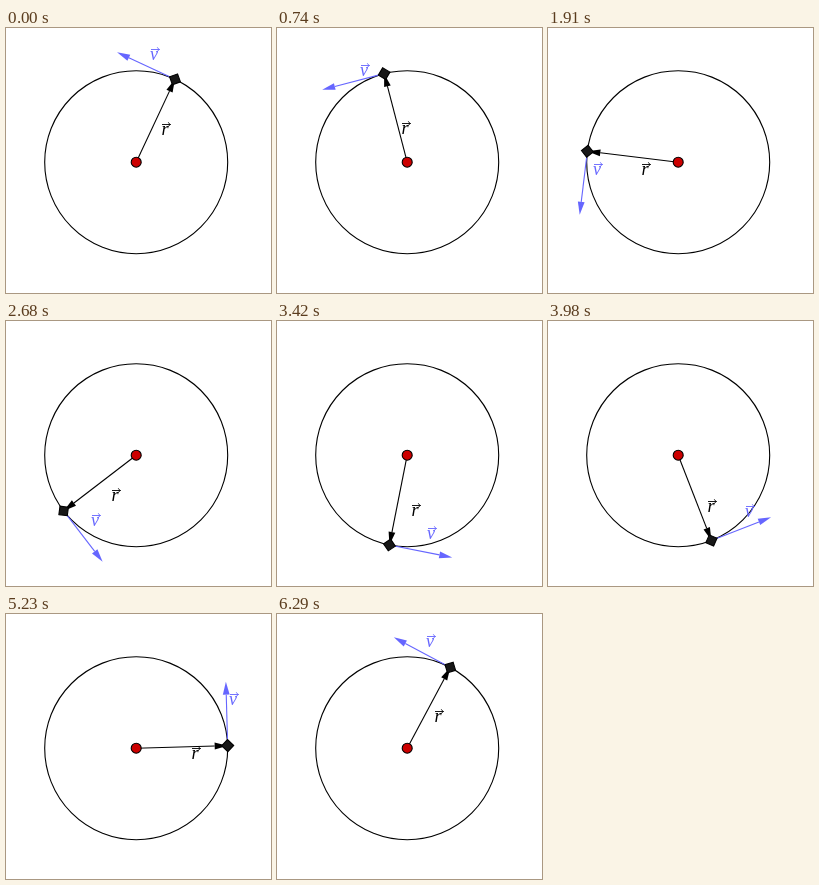
An HTML page with a canvas that plays this animation: 265x265 px, repeating every 6.35 s.

```html
<!DOCTYPE html>
<html lang="en">
<head>
<meta charset="utf-8">
<title>Circular motion</title>
<style>
  html, body { margin: 0; width: 100%; height: 100%; overflow: hidden; background: #fff; }
  canvas { display: block; width: 265px; height: 265px; }
</style>
</head>
<body>
<canvas id="stage"></canvas>
<script>
const SIZE = 265, LOOP = 6350;
const CX = 130.2, CY = 134.2, R = 91.5, V_LEN = 64;
const BLACK = '#000', BLUE = '#6666ff';

// The picture advances in steps, twelve to a span and four in the last one.
const SPANS = [60, 740, 1400, 2070, 2740, 3420, 4100, 4780, 5460, 6130, LOOP];
// [step, angle in degrees], counter-clockwise
const ANGLES = [[0, 64.9], [13, 104.6], [34, 173.1], [61, 258.8],
                [81, 323.8], [93, 361.6], [112, 421.9]];

const canvas = document.getElementById('stage');
const ctx = canvas.getContext('2d');
const dpr = window.devicePixelRatio || 1;
canvas.width = canvas.height = Math.round(SIZE * dpr);

function stepAt(t) {
  if (t < SPANS[0]) return 0;
  let i = 0;
  while (t >= SPANS[i + 1]) i++;
  const count = i === 9 ? 4 : 12;
  const part = (t - SPANS[i]) / (SPANS[i + 1] - SPANS[i]) * count;
  return 1 + i * 12 + Math.min(count - 1, Math.floor(part + 0.12));
}

function angleAt(step) {
  let i = 0;
  while (i < ANGLES.length - 2 && step > ANGLES[i + 1][0]) i++;
  const [s0, a0] = ANGLES[i], [s1, a1] = ANGLES[i + 1];
  return (a0 + (a1 - a0) * (step - s0) / (s1 - s0)) * Math.PI / 180;
}

function disc(x, y, r, fill) {
  ctx.beginPath();
  ctx.arc(x, y, r, 0, 2 * Math.PI);
  if (fill) {
    ctx.fillStyle = fill;
    ctx.fill();
  }
  ctx.strokeStyle = BLACK;
  ctx.stroke();
}

function arrow(x, y, dx, dy, len, color) {
  const tx = x + dx * len, ty = y + dy * len;
  const bx = tx - dx * 13, by = ty - dy * 13;
  ctx.strokeStyle = ctx.fillStyle = color;
  ctx.beginPath();
  ctx.moveTo(x, y);
  ctx.lineTo(bx, by);
  ctx.stroke();
  ctx.beginPath();
  ctx.moveTo(tx, ty);
  ctx.lineTo(bx - dy * 3.4, by + dx * 3.4);
  ctx.lineTo(bx + dy * 3.4, by - dx * 3.4);
  ctx.fill();
}

// Letter with a small vector arrow above, centred on x, y
function label(text, x, y, color) {
  x = Math.round(x);
  y = Math.round(y);
  ctx.fillStyle = ctx.strokeStyle = color;
  ctx.font = 'italic 18px "Liberation Serif", serif';
  ctx.textAlign = 'center';
  ctx.fillText(text, x, y + 6);
  ctx.lineWidth = 0.9;
  ctx.beginPath();
  ctx.moveTo(x - 3, y - 4.5);
  ctx.lineTo(x + 5.5, y - 4.5);
  ctx.moveTo(x + 3.3, y - 6.7);
  ctx.quadraticCurveTo(x + 4, y - 5, x + 5.5, y - 4.5);
  ctx.quadraticCurveTo(x + 4, y - 4, x + 3.3, y - 2.3);
  ctx.stroke();
}

function square(x, y, a) {
  ctx.beginPath();
  for (let i = 0; i < 4; i++) {
    const b = a + i * Math.PI / 2;
    ctx.lineTo(x + 6 * Math.cos(b), y - 6 * Math.sin(b));
  }
  ctx.closePath();
  ctx.fillStyle = '#181818';
  ctx.fill();
  ctx.strokeStyle = BLACK;
  ctx.stroke();
}

function draw(t) {
  const a = angleAt(stepAt(t));
  const rx = Math.cos(a), ry = -Math.sin(a);
  const vx = ry, vy = -rx;
  const px = CX + rx * R, py = CY + ry * R;

  ctx.setTransform(dpr, 0, 0, dpr, 0, 0);
  ctx.fillStyle = '#fff';
  ctx.fillRect(0, 0, SIZE, SIZE);
  ctx.lineWidth = 1.1;

  disc(CX, CY, R);
  arrow(px, py, vx, vy, V_LEN, BLUE);
  arrow(CX, CY, rx, ry, R, BLACK);
  square(px, py, a);
  disc(CX, CY, 5, '#cc0000');

  label('r', CX + rx * R / 2 + 12.9 + 3.7 * ry, CY + ry * R / 2 + 9.4 - 3.2 * rx, BLACK);
  label('v', px + vx * V_LEN / 2 + 9.5 + 3.6 * vy, py + vy * V_LEN / 2 - 14.7 - 3.4 * vx, BLUE);
}

const start = performance.now();
function tick() {
  draw((performance.now() - start) % LOOP);
  requestAnimationFrame(tick);
}
tick();
</script>
</body>
</html>
```
